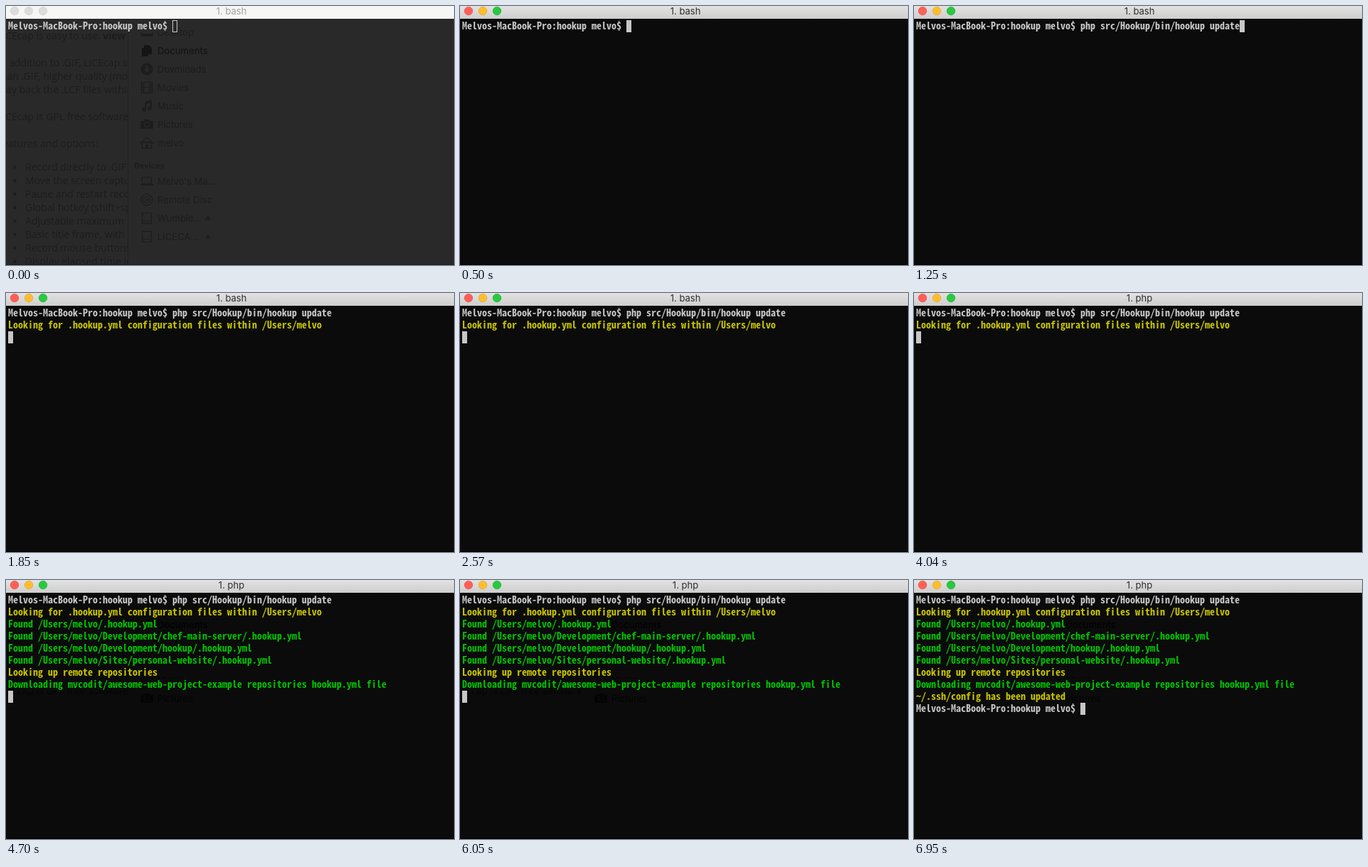
These frames come from a looping animation (630x365 px, 8000 ms). An HTML page with a canvas:

```html
<!DOCTYPE html>
<html lang="en">
<head>
<meta charset="utf-8">
<title>Terminal</title>
<style>
html, body { margin: 0; width: 100%; height: 100%; overflow: hidden; background: #0b0b0b; }
canvas { display: block; width: 630px; height: 365px; }
</style>
</head>
<body>
<canvas id="stage" width="630" height="365"></canvas>
<script>
const ctx = document.getElementById('stage').getContext('2d');
const W = 630, H = 365, LOOP = 8000;
const CELL = 7, ROW = 17, LEFT = 3, TOP = 20;
const UI = 'Inter, Roboto, sans-serif';
const PAGE = '14px "Open Sans", "Noto Sans", sans-serif';
const WHITE = '#c7c7c7', YELLOW = '#c7c400', GREEN = '#00c200';

// Font size at which one character fills one terminal cell
const monoAt = size => `bold ${size}px "Noto Sans Mono CJK JP", "Noto Sans Mono", monospace`;
ctx.font = monoAt(100);
const MONO = monoAt(CELL * 100 / ctx.measureText('m').width);

const PROMPT = 'Melvos-MacBook-Pro:hookup melvo$ ';
const COMMAND = 'php src/Hookup/bin/hookup update';

// Time each line appears, colour, text
const OUTPUT = [
  [1850, YELLOW, 'Looking for .hookup.yml configuration files within /Users/melvo'],
  [4700, GREEN, 'Found /Users/melvo/.hookup.yml'],
  [4700, GREEN, 'Found /Users/melvo/Development/chef-main-server/.hookup.yml'],
  [4700, GREEN, 'Found /Users/melvo/Development/hookup/.hookup.yml'],
  [4700, GREEN, 'Found /Users/melvo/Sites/personal-website/.hookup.yml'],
  [4700, YELLOW, 'Looking up remote repositories'],
  [4700, GREEN, 'Downloading mvcodit/awesome-web-project-example repositories hookup.yml file'],
  [6950, YELLOW, '~/.ssh/config has been updated'],
  [6950, WHITE, PROMPT]
];

const ARTICLE = [
  [47, 'LICEcap is easy to use: '],
  [85, 'In addition to .GIF, LICEcap saves'],
  [104, 'than .GIF, higher quality (more'],
  [123, 'play back the .LCF files within'],
  [161, 'LICEcap is GPL free software'],
  [199, 'Features and options:']
];
const FEATURES = ['Record directly to .GIF', 'Move the screen capture', 'Pause and restart record',
  'Global hotkey (shift+space', 'Adjustable maximum', 'Basic title frame, with',
  'Record mouse buttons', 'Display elapsed time in'];
const PLACES = ['Desktop', 'Documents', 'Downloads', 'Movies', 'Music', 'Pictures', 'melvo'];
const DEVICES = ["Melvo's Ma...", 'Remote Disc', 'Wumble...', 'LICECA...'];

function rect(x, y, w, h, color) {
  ctx.fillStyle = color;
  ctx.fillRect(x, y, w, h);
}

function text(str, x, y, font, color, align = 'left') {
  ctx.font = font;
  ctx.fillStyle = color;
  ctx.textAlign = align;
  ctx.fillText(str, x, y);
}

function disc(x, y, r, fill, stroke) {
  ctx.beginPath();
  ctx.arc(x, y, r, 0, Math.PI * 2);
  if (fill) { ctx.fillStyle = fill; ctx.fill(); }
  if (stroke) { ctx.strokeStyle = stroke; ctx.stroke(); }
}

function poly(points, fill, stroke) {
  ctx.beginPath();
  points.forEach(([x, y]) => ctx.lineTo(x, y));
  ctx.closePath();
  if (fill) { ctx.fillStyle = fill; ctx.fill(); }
  if (stroke) { ctx.strokeStyle = stroke; ctx.stroke(); }
}

// Sidebar icons, drawn around their centre
const ICONS = {
  Desktop(c) { ctx.strokeRect(-8, -6, 16, 11); rect(-8, 2, 16, 3, c); },
  Documents(c) {
    poly([[-4, -8], [3, -8], [7, -4], [7, 5], [-4, 5]], c);
    rect(-7, -4, 9, 12, c);
  },
  Downloads(c, bg) {
    disc(0, 0, 8.5, c);
    rect(-1.5, -5, 3, 5, bg);
    poly([[-4, 0], [4, 0], [0, 5]], bg);
  },
  Movies(c) {
    ctx.strokeRect(-7.5, -7.5, 15, 15);
    ctx.strokeRect(-4.5, -7.5, 9, 15);
    rect(-4, -1, 8, 1, c);
    for (let y = -5; y < 7; y += 4) { rect(-7, y, 3, 1, c); rect(4, y, 3, 1, c); }
  },
  Music(c) {
    disc(-4, 5, 3, c);
    disc(4, 3, 3, c);
    rect(-3, -6, 2, 11, c);
    rect(5, -8, 2, 11, c);
    poly([[-3, -6], [7, -9], [7, -5], [-3, -2]], c);
  },
  Pictures(c, bg) {
    rect(-9, -5, 18, 11, c);
    rect(-4, -7, 8, 3, c);
    disc(0, 0, 3.5, null, bg);
  },
  melvo(c) {
    poly([[-9, 0], [0, -8], [9, 0]], null, c);
    ctx.strokeRect(-6.5, -1.5, 13, 9);
    rect(-2, 2, 4, 6, c);
  },
  laptop(c) { ctx.strokeRect(-6.5, -5.5, 13, 9); rect(-9, 4, 18, 2, c); },
  cd(c) { disc(0, 0, 8, null, c); disc(0, 0, 4.5, null, c); disc(0, 0, 1.5, c); },
  drive(c) { ctx.strokeRect(-6.5, -7.5, 13, 15); rect(-6, 3, 12, 1, c); }
};

function icon(name, y, color, bg) {
  ctx.save();
  ctx.translate(198, y);
  ctx.strokeStyle = color;
  ctx.lineWidth = 1.2;
  ICONS[name](color, bg);
  ctx.restore();
}

// Windows showing faintly through the terminal
function backdrop(color, strong, bg) {
  ctx.save();
  ctx.beginPath();
  ctx.rect(0, 18, 171, H);
  ctx.clip();
  for (const [y, str] of ARTICLE) text(str, -12, y, PAGE, color);
  text('view', 136, 47, 'bold ' + PAGE, color);
  FEATURES.forEach((str, i) => {
    const y = 232 + i * 19;
    disc(12.5, y - 5, 2.2, color);
    text(str, 27, y, PAGE, color);
  });
  ctx.restore();

  PLACES.forEach((name, i) => {
    const y = 42 + i * 26, c = i === 1 ? strong : color;
    icon(name, y - 5, c, bg);
    text(name, 213, y, (i === 1 ? '500 ' : '') + '13px ' + UI, c);
  });
  text('Devices', 180, 229, '600 11px ' + UI, color);
  DEVICES.forEach((name, i) => {
    const y = 252 + i * 26;
    icon(['laptop', 'cd', 'drive', 'drive'][i], y - 5, color, bg);
    text(name, 213, y, '13px ' + UI, color);
    if (i > 1) {
      poly([[280, y - 4], [288, y - 4], [284, y - 8]], color);
      rect(280, y - 3, 8, 1, color);
    }
  });
}

function line(row, str, color, bg) {
  const y = TOP + row * ROW;
  rect(0, y, LEFT + str.length * CELL, ROW, bg);
  text(str, LEFT, y + 13, MONO, color);
}

function titleBar(title, active) {
  const fill = ctx.createLinearGradient(0, 0, 0, 18);
  fill.addColorStop(0, active ? '#e2e2e2' : '#f6f6f6');
  fill.addColorStop(1, active ? '#cecece' : '#f6f6f6');
  rect(0, 0, W, 18, fill);
  const lights = active
    ? [['#ff5f57', '#e2463f'], ['#ffbd2e', '#e1a116'], ['#28c940', '#12ac28']]
    : Array(3).fill(['#dcdcdc', '#d0d0d0']);
  ctx.lineWidth = 0.6;
  lights.forEach(([c, edge], i) => disc(12 + i * 20, 7, 5.8, c, edge));
  text(title, 317, 12, '13px ' + UI, active ? '#2c2c2c' : '#a0a0a0', 'center');
}

function draw(t) {
  const active = t >= 500;
  const bg = active ? '#0b0b0b' : '#292929';
  rect(0, 0, W, H, bg);

  if (!active) {
    backdrop('#1d1d1d', '#151515', bg);
    rect(171, 18, 1, H, '#222222');
  } else if (t >= 4700) {
    ctx.save();
    ctx.beginPath();
    ctx.rect(LEFT, 54, 532, 119);
    ctx.clip();
    backdrop('#040404', '#020202', bg);
    ctx.restore();
  }

  const lines = [[0, WHITE, PROMPT + (t >= 1250 ? COMMAND : '')], ...OUTPUT]
    .filter(([at]) => t >= at);
  lines.forEach(([, color, str], i) => line(i, str, color, bg));

  // The cursor follows a prompt, or waits on the next empty row
  const last = lines.length - 1;
  const atPrompt = last === 0 || t >= 6950;
  const x = LEFT + (atPrompt ? lines[last][2].length * CELL : 0);
  const y = TOP + (atPrompt ? last : last + 1) * ROW;
  if (active) {
    rect(x, y, CELL, ROW, WHITE);
  } else {
    ctx.strokeStyle = WHITE;
    ctx.lineWidth = 1;
    ctx.strokeRect(x + 0.5, y + 0.5, CELL - 1, ROW - 1);
  }

  rect(0, H - 1, W, 1, active ? '#000000' : '#1c1c1c');
  titleBar(t >= 3050 ? '1. php' : '1. bash', active);
}

const start = performance.now();
function tick() {
  draw((performance.now() - start) % LOOP);
  requestAnimationFrame(tick);
}
tick();
</script>
</body>
</html>
```
